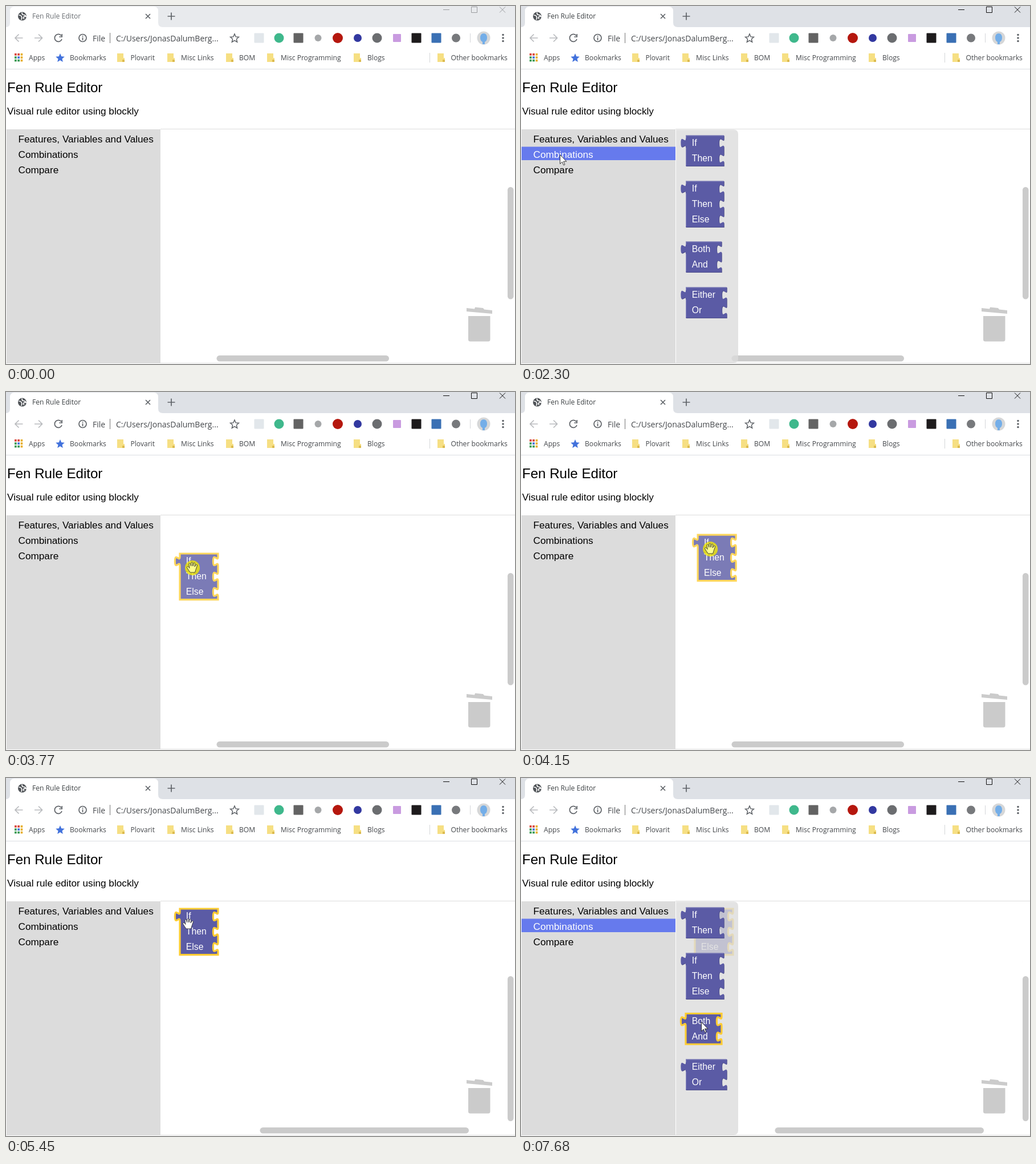
These frames come from a looping animation (893x627 px, 8000 ms). An HTML page:

```html
<!DOCTYPE html>
<html lang="en">
<head>
<meta charset="utf-8">
<title>Rule editor</title>
<style>
html, body { margin: 0; width: 100%; height: 100%; overflow: hidden; background: #fff; }
svg { display: block; width: 893px; height: 627px; }
text { font-family: "Liberation Sans", Arial, sans-serif; font-size: 17.2px; fill: #000; }
.ui text { font: 12.1px "Open Sans", "Noto Sans", sans-serif; fill: #44474b; }
.ui .url text { font-size: 14px; }
.line { fill: none; stroke: #5f6368; stroke-width: 1.7; }
#frame { fill: #e8eaed; }
#controls { fill: none; stroke: #9a9c9f; }
.ui #tabTitle { fill: #6a6e73; }
.active #frame { fill: #dee1e6; }
.active #controls { stroke: #111; }
.active #tabTitle { fill: #3c4043; }
.block text { font-size: 14.67px; fill: #fff; }
.body { fill: #5b5ba5; }
.shade { fill: #494984; }
.light { fill: none; stroke: #8c8cc0; }
.picked .body { stroke: #fc3; stroke-width: 3; }
.picked .light, .picked .shade { display: none; }
.bar { fill: #cbcbcb; }
</style>
</head>
<body>
<svg id="stage" viewBox="0 0 893 627">
  <rect width="893" height="627" fill="#fff"/>
  <g class="ui">
    <rect id="frame" width="893" height="37"/>
    <path d="M0 37Q7 37 7 29V9Q7 1 15 1H259Q267 1 267 9V29Q267 37 275 37Z" fill="#fff"/>
    <circle cx="28.5" cy="18" r="7.5" fill="#505458"/>
    <path d="M22.5 16q4 0 5 3t-1 5M28 11.5q0 4 3 4t4 3q-3-1-4 1t1 3" fill="none" stroke="#fff" stroke-width="1.7"/>
    <text id="tabTitle" x="46" y="22">Fen Rule Editor</text>
    <path class="line" d="M245 14l8 8m0-8l-8 8M283.500 18h13m-6.500-6.500v13" stroke-width="2"/>
    <path id="controls" d="M767 6.500h11M816.500 1.500h10v10h-10zM866 1.500l10 10m0-10l-10 10"/>
    <path class="line" d="M29.500 56H16m6.500-6.500L16 56l6.500 6.500M50 56h13.500M57 49.500l6.500 6.500-6.500 6.500" style="stroke:#b9bbbe"/>
    <path class="line" d="M97 52A6.500 6.500 0 1 0 98 58M98.200 49v5h-5" stroke-width="2"/>
    <circle class="line" cx="134.500" cy="56" r="6.500"/>
    <path class="line" d="M134.500 55v5M134.500 52v1.800"/>
    <path d="M182.500 47v18" stroke="#777"/>
    <g class="url"><text x="152" y="61.500">File</text><text x="193" y="61.500">C:/Users/JonasDalumBerg...</text></g>
    <path class="line" id="star" d="M401 49l2.100 4.900 5.300.500-4 3.500 1.200 5.200-4.600-2.800-4.600 2.800 1.200-5.200-4-3.500 5.300-.500z" style="stroke-width:1.500"/>
    <g id="extensions"></g>
    <path d="M814.500 48v16M743.500 82v17" stroke="#d4d6d9"/>
    <circle cx="838" cy="56" r="11.500" fill="#d6d7d8"/>
    <path d="M836 67v-4q-4-2-4-7 0-8 6-8t6 8q0 5-4 7v4z" fill="#74aee8"/>
    <g fill="#5f6368"><circle cx="872" cy="50.500" r="1.800"/><circle cx="872" cy="56" r="1.800"/><circle cx="872" cy="61.500" r="1.800"/></g>
    <g id="apps"></g>
    <path d="M95 83l2.200 5.200 5.600.500-4.300 3.700 1.300 5.500-4.800-2.900-4.800 2.900 1.300-5.500-4.300-3.700 5.600-.500z" fill="#4272dc"/>
    <g id="bookmarks"></g>
    <path d="M0 110.500H893" stroke="#dcdee1"/>
  </g>

  <text x="2" y="151" style="font-size:24.1px">Fen Rule Editor</text>
  <text x="2" y="190">Visual rule editor using blockly</text>

  <path d="M271 215.500H893M0 625.500H893" stroke="#ddd"/>
  <g id="placed" class="block picked"></g>
  <rect id="vbar" class="bar" x="880" width="10.500" rx="5.200"/>
  <rect id="hbar" class="bar" y="612" height="10.500" rx="5.200"/>
  <path class="bar" d="M808 529l14 1.500 1-3 14 1.500 2 2.500 14 1.500v6l-45-4zM811 543h38.500v41q0 3.500-3.500 3.500h-31.500q-3.500 0-3.500-3.500z"/>
  <rect x="1" y="216" width="270" height="409" fill="#dcdcdc"/>
  <rect id="row" x="1" y="246.500" width="270" height="23.500"/>
  <text x="21.500" y="239">Features, Variables and Values</text>
  <text id="rowLabel" x="21.500" y="265.700">Combinations</text>
  <text x="21.500" y="293">Compare</text>
  <g id="flyout">
    <path d="M272 216.500H373q8 0 8 8V617q0 8-8 8H272z" fill="#ddd" fill-opacity=".8"/>
  </g>
  <circle id="press" r="13" fill="#f4ea00" fill-opacity=".78"/>
  <path id="arrow" d="M.5.5V16.500L4.200 13 6.800 18.700 9 17.700 6.500 12.200H11.800Z" fill="#fff" stroke="#222" stroke-width=".9"/>
  <path id="hand" d="M-4 9C-6 6-8 3-9.500.5-10-1.500-8-2-6.500-.5L-5 1.500-6-5.500C-6-7.500-3.800-7.500-3.300-5.500L-2.300-2-2-7.500C-1.800-9.300.4-9.300.6-7.500L.8-2 2-6.800C2.600-8.500 4.600-8 4.500-6.300L4-1 6-4C7-5.500 9-4.500 8.400-3L6 4 4.500 9Z" stroke="#333" stroke-width=".9"/>
</svg>
<script>
const LOOP = 8000, SCALE = 1.075, ROW = 25;
const $ = id => document.getElementById(id);
const show = (el, on) => el.style.display = on ? '' : 'none';
const moveTo = (el, x, y) => el.setAttribute('transform', `translate(${x} ${y})`);
const setAttrs = (el, attrs) => Object.entries(attrs).forEach(([k, v]) => el.setAttribute(k, v));

// Browser chrome
const icons = [
  [444, '#e2e7eb', 0], [479, '#3fb88c', 1], [513, '#636363', 0], [547.5, '#a5a7a9', 1, 6],
  [582, '#b5170e', 1, 9], [617, '#3238a0', 1, 7], [651, '#6b6d70', 1], [686, '#c99be0', 0, 7],
  [720, '#1d1b1c', 0], [755, '#3a70b4', 0], [789.5, '#77797c', 1, 7.5]
];
$('extensions').innerHTML = icons.map(([x, color, round, r = 8.5]) =>
  `<rect x="${x - r}" y="${56 - r}" width="${2 * r}" height="${2 * r}" rx="${round ? r : 1}" fill="${color}"/>`).join('');

const dotColors = ['#d9453a', '#d9453a', '#e8b02c', '#3a9b54', '#4272dc', '#e8b02c', '#3a9b54', '#3a9b54', '#e8b02c'];
$('apps').innerHTML = dotColors.map((color, i) =>
  `<rect x="${15 + i % 3 * 5.3}" y="${83 + Math.floor(i / 3) * 5.3}" width="3.7" height="3.7" fill="${color}"/>`).join('');

const bookmarks = [
  [40, 'Apps'], [112, 'Bookmarks'], [218.5, 'Plovarit', 195], [307, 'Misc Links', 283], [409, 'BOM', 386],
  [482, 'Misc Programming', 458], [634, 'Blogs', 610], [780.5, 'Other bookmarks', 757]
];
$('bookmarks').innerHTML = bookmarks.map(([x, label, folder]) =>
  `<text x="${x}" y="95">${label}</text>` + (folder
    ? `<path d="M${folder} 83h11v8h2v7h-13z" fill="#f6df83"/><path d="M${folder + 9} 98v-4h4v4z" fill="#dcbb50"/>` : '')).join('');

// Puzzle blocks
function blockMarkup(labels, width) {
  const w = width / SCALE, h = labels.length * ROW;
  const socket = 'v5c0 10-8-8-8 7.5s8-2.5 8 7.5';
  const side = labels.map((_, i) => `${socket}V${(i + 1) * ROW}`).join('');
  const d = `M0 0H${w}${side}H0V20c0-10-8 8-8-7.5s8 2.5 8-7.5Z`;
  const texts = labels.map((s, i) => `<text x="10" y="${17.2 + i * ROW}">${s}</text>`).join('');
  return `<g transform="scale(${SCALE})"><path class="shade" d="${d}" transform="translate(.7 .7)"/>` +
    `<path class="body" d="${d}"/><path class="light" d="M.5 ${h - 1}V20M.5 5V.5H${w - 1}"/>${texts}</g>`;
}

const shelfX = 289;
const shelf = [
  [226.5, 67, ['If', 'Then']], [306.5, 67, ['If', 'Then', 'Else']],
  [412.5, 63, ['Both', 'And']], [492.5, 72, ['Either', 'Or']]
].map(([y, width, labels]) => {
  const el = document.createElementNS('http://www.w3.org/2000/svg', 'g');
  el.setAttribute('class', 'block');
  el.innerHTML = blockMarkup(labels, width);
  moveTo(el, shelfX, y);
  $('flyout').append(el);
  return { el, y, width, height: labels.length * ROW * SCALE };
});
$('placed').innerHTML = blockMarkup(['If', 'Then', 'Else'], 67);

const bursts = [
  [0, 0, 1], [830, 1600, 11], [1670, 2300, 9], [2610, 3310, 10], [3540, 4310, 11], [4390, 4840, 7],
  [4990, 4990, 1], [5450, 6220, 11], [6300, 6610, 5], [6840, 7600, 11], [7680, 7680, 1]
];
function heldTime(t) {
  const [start, end, n] = bursts.findLast(b => b[0] <= t);
  if (n === 1) return start;
  const step = (end - start) / (n - 1);
  return start + step * Math.min(n - 1, Math.floor((t - start + 12) / step));
}

// Pointer path: time, x, y
const path = [
  [830, 594, 610], [984, 420, 570], [1138, 224, 488], [1215, 122, 421], [1292, 38, 358], [1369, 50, 319],
  [1600, 60, 281], [1830, 68, 260], [2530, 68, 260], [2690, 90, 263], [2920, 220, 292], [3150, 300, 325],
  [3310, 311, 330.5], [3617, 312, 329], [3694, 320, 321], [3771, 327, 307], [4080, 331, 280], [4310, 334.5, 262],
  [4390, 334, 261], [4540, 330, 256], [4840, 327, 253], [5370, 327, 253], [5450, 320, 255], [5680, 205, 283],
  [5835, 110, 299], [5990, 45, 289], [6220, 72, 254], [6760, 72, 254], [6840, 80, 257], [7070, 160, 312],
  [7300, 270, 396], [7450, 309, 423], [7600, 316, 426], [7680, 316, 427]
];
function pointerAt(t) {
  const i = path.findIndex(k => k[0] > t);
  if (i === 0) return path[0].slice(1);
  if (i < 0) return path.at(-1).slice(1);
  const [t0, x0, y0] = path[i - 1], [t1, x1, y1] = path[i];
  const f = (t - t0) / (t1 - t0);
  return [x0 + (x1 - x0) * f, y0 + (y1 - y0) * f];
}

function render(now) {
  const t = heldTime(now % LOOP) + 1;
  const within = (a, b) => t >= a && t < b;
  const [x, y] = pointerAt(t - 1);
  const open = within(2300, 3610) || t >= 6610;
  const dragging = within(3610, 4990);
  const grabbing = within(3540, 5500);
  const pressed = within(1980, 2290) || within(3540, 4990) || within(6300, 6600);
  const dropped = t >= 4990;

  $('stage').classList.toggle('active', t >= 1980);
  const overRow = x < 271 && y > 246 && y < 270 && t > 830;
  show($('row'), open || overRow);
  $('row').style.fill = open ? '#667aed' : '#e3e3e3';
  $('rowLabel').style.fill = open ? '#fff' : '#000';

  show($('flyout'), open);
  for (const b of shelf) {
    const hovered = x > shelfX && x < shelfX + b.width && y > b.y && y < b.y + b.height;
    b.el.classList.toggle('picked', hovered);
  }

  show($('placed'), dragging || dropped);
  $('placed').style.opacity = dragging ? .8 : 1;
  moveTo($('placed'), ...(dropped ? [305, 229] : [x - 22, y - 24]));
  setAttrs($('vbar'), dropped ? { y: 347, height: 254 } : { y: 317, height: 196.5 });
  setAttrs($('hbar'), dropped ? { x: 445.5, width: 366.5 } : { x: 369.5, width: 302.5 });

  show($('press'), pressed);
  moveTo($('press'), x, y + 1);
  show($('arrow'), t > 830 && !grabbing);
  moveTo($('arrow'), x, y);
  show($('hand'), grabbing);
  moveTo($('hand'), x, y);
  $('hand').style.fill = pressed ? '#ffff8c' : '#fff';
}

const begin = performance.now();
function loop() {
  render(performance.now() - begin);
  requestAnimationFrame(loop);
}
loop();
</script>
</body>
</html>
```
